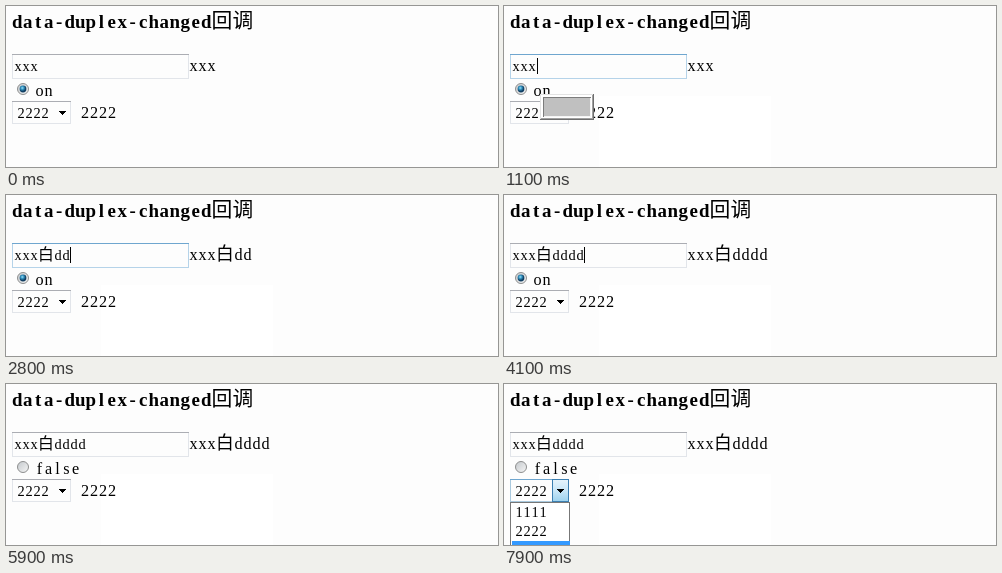
Recreate the animation shown at these times as an HTML page. Size 492x161 px, loop 8000 ms.

```html
<!DOCTYPE html>
<html lang="en">
<head>
<meta charset="utf-8">
<title>Form binding demo</title>
<style>
html, body { margin: 0; height: 100%; overflow: hidden; background: #fdfdfd; }
svg { display: block; width: 492px; height: 161px; }
text { font-family: "Liberation Serif", serif; text-anchor: middle; fill: #000; }
.title { font-weight: bold; }
.cjk { font-family: "Noto Sans CJK SC", "Noto Sans CJK", sans-serif; font-size: 1.1em; }
.title .cjk { font-weight: 500; }
.edge { shape-rendering: crispEdges; }
</style>
</head>
<body>
<svg viewBox="0 0 492 161">
  <defs>
    <radialGradient id="dot" cx=".4" cy=".35">
      <stop offset="0" stop-color="#9be0f8"/>
      <stop offset=".5" stop-color="#2f8fbd"/>
      <stop offset="1" stop-color="#123f63"/>
    </radialGradient>
    <linearGradient id="ring" x2="1" y2="1">
      <stop offset="0" stop-color="#c4c8cc"/>
      <stop offset="1" stop-color="#f6f6f6"/>
    </linearGradient>
    <linearGradient id="hot" x2="0" y2="1">
      <stop offset="0" stop-color="#e6f4fc"/>
      <stop offset=".5" stop-color="#c9e7f8"/>
      <stop offset="1" stop-color="#9dd2ee"/>
    </linearGradient>
  </defs>
  <rect id="panel" class="edge" x="95" y="90" width="172" height="71" fill="#fff"/>
  <text class="title" data-x="6" data-em="21" y="22">data-duplex-changed回调</text>

  <g class="edge" fill="none">
    <rect id="box" x="6.5" y="48.5" width="176" height="24" fill="#fdfdfd"/>
    <path id="boxTop" d="M6 48.5H183"/>
  </g>
  <text class="value" data-x="8" data-em="16" y="65"></text>
  <text class="value" data-x="183" data-em="18" y="65"></text>
  <rect id="caret" class="edge" y="52" width="1" height="16"/>

  <circle id="radio" cx="17" cy="83" r="5.5" fill="url(#ring)"/>
  <circle id="mark" cx="17" cy="83" r="3.4" fill="url(#dot)"/>
  <text id="label" data-x="29" data-em="18" y="90"></text>

  <g class="edge">
    <rect id="select" x="6.5" y="95.5" width="58" height="22" fill="#fdfdfd"/>
    <path id="selectTop" d="M6 95.5H65"/>
    <rect id="button" x="48.5" y="95.5" width="16" height="22" fill="url(#hot)" stroke="#3c7fb1"/>
    <path d="M52.5 105H60.5L56.5 109Z"/>
  </g>
  <text data-x="11" data-em="16" y="112">2222</text>
  <text data-x="74.5" data-em="18" y="112">2222</text>

  <g id="list">
    <path class="edge" d="M6.5 162V118.5H65.5V162" fill="#fff" stroke="#777"/>
    <rect id="bar" class="edge" x="8" width="58" height="19" fill="#3399ff"/>
    <text data-x="11" data-em="16" y="133">1111</text>
    <text data-x="11" data-em="16" y="152">2222</text>
  </g>

  <g id="popup" class="edge">
    <rect x="36" y="88" width="54" height="26" fill="#6e6e6e"/>
    <rect x="36" y="88" width="53" height="25" fill="#e3e3e3"/>
    <rect x="37" y="89" width="52" height="24" fill="#a0a0a0"/>
    <rect x="37" y="89" width="51" height="23" fill="#fff"/>
    <rect x="39" y="91" width="48" height="20" fill="#7c7c7c"/>
    <rect x="40" y="92" width="47" height="19" fill="#f4f4f4"/>
    <rect x="40" y="92" width="46" height="18" fill="#c0c0c0"/>
  </g>
</svg>
<script>
const LOOP = 8000;
const $ = id => document.getElementById(id);
const all = (css, fn) => document.querySelectorAll(css).forEach(fn);
const show = (el, on) => el.style.display = on ? "" : "none";
const stroke = (id, color) => $(id).setAttribute("stroke", color);
const within = (t, ...spans) => spans.some(([a, b]) => t >= a && t < b);
// Value of the last [time, value] step already reached.
const step = (t, steps) => steps.filter(s => s[0] <= t).pop()[1];

// Monospaced cells: Latin takes half an em, Chinese a whole one.
function write(el, str) {
  if (el.shown === str) return;
  el.shown = str;
  const em = +el.dataset.em;
  let x = +el.dataset.x;
  const centers = [...str].map(c => {
    const w = c > "\xff" ? em : em / 2;
    x += w;
    return x - w / 2;
  });
  el.setAttribute("font-size", em * 0.9);
  el.setAttribute("x", centers.join(" "));
  el.innerHTML = str.replace(/[^\x00-\xff]+/g, '<tspan class="cjk">$&</tspan>');
}

function draw(t) {
  // Text input
  const focus = within(t, [600, 3300]);
  stroke("box", focus ? "#b5d3e9" : "#e2e5ea");
  stroke("boxTop", focus ? "#6fa6cf" : "#abadb3");
  const han = t >= 1700;
  const count = step(t, [[0, 0], [2800, 2], [3000, 3], [3100, 4]]);
  all(".value", el => write(el, "xxx" + (han ? "白" : "") + "d".repeat(count)));
  $("caret").setAttribute("x", han ? 48 + 8 * count : 33);
  show($("caret"), within(t, [600, 1300], [1700, 2200], [2500, 3600], [4100, 4300]));
  show($("popup"), within(t, [800, 2400]));
  show($("panel"), t >= 1000);

  // Radio
  const label = step(t, [[0, "on"], [4500, "false"], [4900, "true"],
    [5300, "false"], [5600, "true"], [5800, "false"]]);
  write($("label"), label);
  show($("mark"), label !== "false");
  stroke("radio", within(t, [4300, 5900]) ? "#5586a3" : "#8e8f8f");

  // Drop-down
  const open = within(t, [6200, 6900], [7500, LOOP]);
  const hot = within(t, [6100, 7100], [7400, LOOP]);
  const row = step(t, [[0, 1], [6400, 0], [6500, 1], [7700, 2]]);
  show($("list"), open);
  show($("button"), hot);
  stroke("select", hot ? "#a9c9de" : "#e2e5ea");
  stroke("selectTop", hot ? "#6fa6cf" : "#abadb3");
  $("bar").setAttribute("y", 119 + 19 * row);
  all("#list text", (el, i) => el.style.fill = i === row ? "#fff" : "");
}

all("text", el => write(el, el.textContent));
const start = performance.now();
function tick() {
  draw((performance.now() - start) % LOOP);
  requestAnimationFrame(tick);
}
tick();
</script>
</body>
</html>
```
